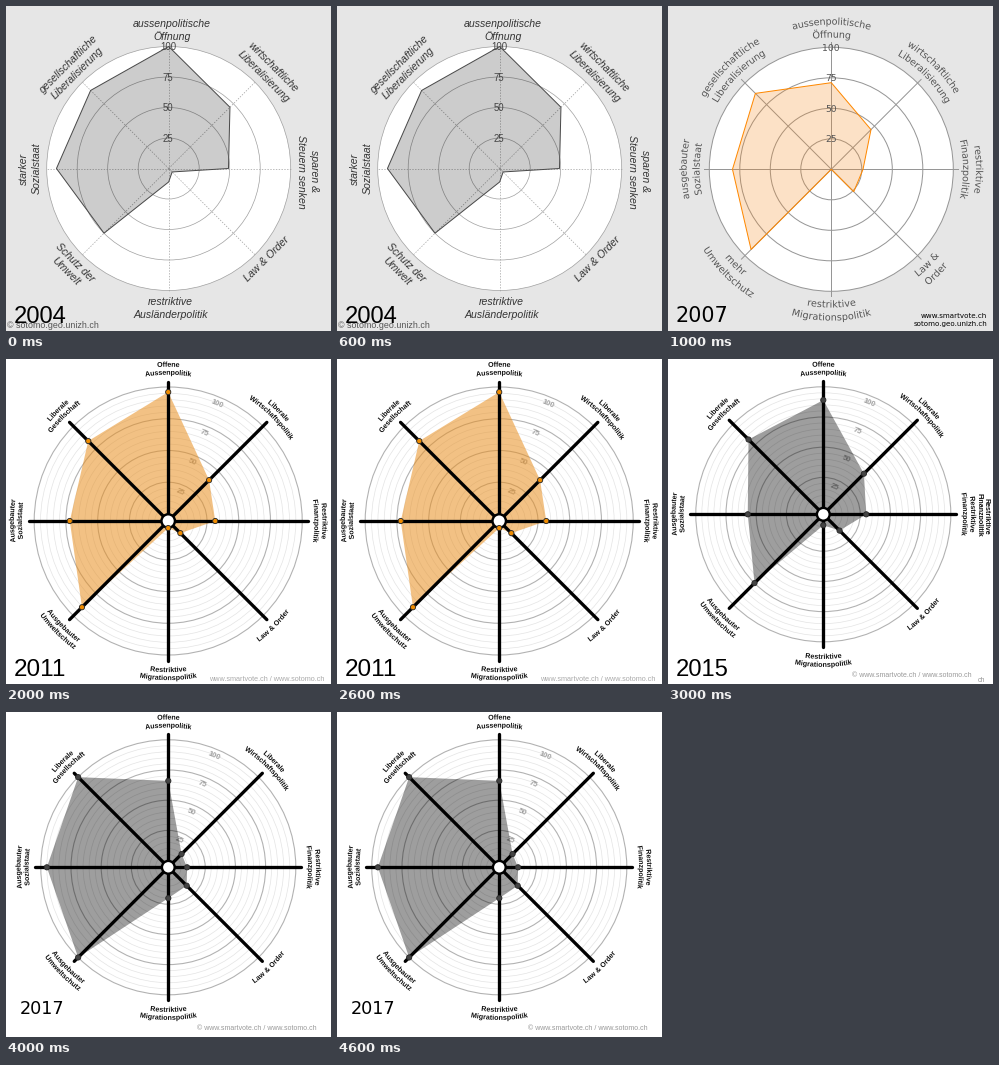
Recreate the animation shown at these times as a matplotlib script. Size 325 by 325 pixels, loop 5 s.

```python
import numpy as np
import matplotlib.pyplot as plt
from matplotlib.animation import FuncAnimation
from matplotlib.patches import Circle, PathPatch, Polygon, Rectangle
from matplotlib.path import Path
from matplotlib.textpath import TextPath

SIZE, DPI = 325, 100
PX = 72 / DPI
ROT = (0, -45, -90, 45, 0, -45, 90, 45)
OUTER_FIRST = (0, 1, 2, 6, 7)
SANS, WIDE = "Liberation Sans", "DejaVu Sans"

MODERN = ("Offene\nAussenpolitik", "Liberale\nWirtschaftspolitik",
          "Restriktive\nFinanzpolitik", "Law & Order",
          "Restriktive\nMigrationspolitik", "Ausgebauter\nUmweltschutz",
          "Ausgebauter\nSozialstaat", "Liberale\nGesellschaft")

fig = plt.figure(figsize=(SIZE / DPI, SIZE / DPI), dpi=DPI)
ax = fig.add_axes([0, 0, 1, 1])


def polar(center, r, i):
    a = np.pi / 4 * i
    return center[0] + r * np.sin(a), center[1] - r * np.cos(a)


def put(x, y, text, px, rot=0, ha="center", color="#222222", font=SANS, **kw):
    """Text whose middle line passes through (x, y)."""
    a = np.radians(rot)
    drop = 0.34 * px
    ax.text(x + drop * np.sin(a), y + drop * np.cos(a), text, fontsize=px * PX,
            rotation=rot, rotation_mode="anchor", ha=ha, va="baseline",
            color=color, family=font, zorder=8, **kw)


def put_arc(center, r, i, up, text, px, color, font=SANS, weight="normal"):
    """Text bent along a circle; up is 1 if its top points outwards, else -1."""
    path = TextPath((0, 0), text, size=px, prop=dict(family=font, weight=weight))
    u, v = path.vertices.T
    u = u - (u.min() + u.max()) / 2
    x, y = polar(center, r + up * (v - 0.34 * px), i + up * u / r * 4 / np.pi)
    ax.add_patch(PathPatch(Path(np.column_stack((x, y)), path.codes),
                           fc=color, ec="none", zorder=8))


def line(a, b, color, width, z, **kw):
    ax.plot([a[0], b[0]], [a[1], b[1]], color=color, lw=width * PX, zorder=z, **kw)


def ring(center, r, color, width, z=2, fill="none"):
    ax.add_patch(Circle(center, r, fc=fill, ec=color, lw=width * PX, zorder=z))


def area(points, color, alpha):
    ax.add_patch(Polygon(points, fc=color, ec="none", alpha=alpha, zorder=4))


def label_rows(labels, inner, outer):
    """Yield (axis, up, radius, row) for every row of every label."""
    for i, label in enumerate(labels):
        up = 1 if i in OUTER_FIRST else -1
        for row, r in zip(label.split("\n"), (outer, inner)[::up]):
            yield i, up, r, row


def straight_labels(center, labels, inner, outer, px, nudge, **kw):
    for i, _, r, row in label_rows(labels, inner, outer):
        x, y = polar(center, r, i)
        a = np.radians(ROT[i])
        put(x + nudge[i] * np.cos(a), y - nudge[i] * np.sin(a), row, px, ROT[i], **kw)


def bent_labels(center, labels, inner, outer, px, **kw):
    for i, up, r, row in label_rows(labels, inner, outer):
        put_arc(center, r, i, up, row, px, **kw)


def background(color):
    ax.add_patch(Rectangle((-5, -5), SIZE + 10, SIZE + 10, fc=color, ec="none", zorder=0))


def classic(center, values, fill, alpha, edge, grid, width, reach, tick, **spoke):
    background("#e6e6e6")
    ring(center, 122, "none", 0, 1, "white")
    for i in range(8):
        line(center, polar(center, reach, i), grid, width, 3, **spoke)
    points = [polar(center, 1.22 * v, i) for i, v in enumerate(values)]
    area(points, fill, alpha)
    ax.add_patch(Polygon(points, fc="none", ec=edge, lw=PX, zorder=5))
    for v in (25, 50, 75, 100):
        ring(center, 1.22 * v, grid, width)
        put(center[0] - 0.5, center[1] - 1.22 * v + 0.5, str(v), **tick)


def modern(center, radius, values, fill, alpha, dot):
    background("white")
    hub = radius * 0.0525
    reach = radius + 5.5

    def scale(v):
        return hub + (radius - hub) * v / 100

    for v in range(5, 101, 5):
        if v % 25:
            ring(center, scale(v), "#e4e4e4", 0.7)
        else:
            ring(center, scale(v), "#b2b2b2", 1.1)
            x, y = polar(center, scale(v) - 7.3, 0.5)
            ax.text(x, y, str(v), fontsize=7.8 * PX, rotation=-22.5, ha="center",
                    va="center", color="#a0a0a0", family=SANS, weight="bold", zorder=3)
    points = [polar(center, scale(v), i) for i, v in enumerate(values)]
    area(points, fill, alpha)
    for i in range(4):
        line(polar(center, reach, i), polar(center, reach, i + 4), "black", 3.3, 5,
             solid_capstyle="round")
    ring(center, hub - 0.3, "black", 2.4, 6, "white")
    for p in points:
        ring(p, 2.6, "#2a2a2a", 0.9, 7, dot)
    bent_labels(center, MODERN, radius + 14.7, radius + 22.7, 7.1,
                color="#111111", weight="bold")


def year(text, px, x=7.5, y=308.5, font=SANS):
    put(x, y, text, px, ha="left", color="black", font=font)


def chart_2004():
    center = 162.7, 162.5
    classic(center, (100, 71, 49, 4, 11, 75, 92, 90.5), "black", 0.2, "#4a4a4a",
            "#a0a0a0", 0.7, 122, dict(px=9.6, color="#444444"), linestyle=(0, (2, 2)))
    straight_labels(center,
                    ("aussenpolitische\nÖffnung", "wirtschaftliche\nLiberalisierung",
                     "sparen &\nSteuern senken", "Law & Order",
                     "restriktive\nAusländerpolitik", "Schutz der\nUmwelt",
                     "starker\nSozialstaat", "gesellschaftliche\nLiberalisierung"),
                    132.5, 145.5, 10.5, (3, 2, 3, 5, 2, 0, 0, 3),
                    color="#333333", style="italic")
    year("2004", 23.8)
    put(1, 319, "© sotomo.geo.unizh.ch", 8.9, ha="left", color="#555555")


def chart_2007():
    center = 163.3, 163.3
    classic(center, (71, 46, 26, 26, 0, 93, 81, 88), "#f58a1f", 0.25, "#ff8800",
            "#969696", 1, 127, dict(px=9.3, color="#555555", font=WIDE))
    bent_labels(center,
                ("aussenpolitische\nÖffnung", "wirtschaftliche\nLiberalisierung",
                 "restriktive\nFinanzpolitik", "Law &\nOrder",
                 "restriktive\nMigrationspolitik", "mehr\nUmweltschutz",
                 "ausgebauter\nSozialstaat", "gesellschaftliche\nLiberalisierung"),
                135, 148, 9.6, color="#555555", font=WIDE)
    year("2007", 20.8, font=WIDE)
    put(319, 309.5, "www.smartvote.ch", 7.1, ha="right", color="black", font=WIDE)
    put(319, 318, "sotomo.geo.unizh.ch", 7.1, ha="right", color="black", font=WIDE)


def chart_2011():
    modern((162.2, 162), 134, (96, 40, 31.5, 8, 0, 90.5, 72, 83.5),
           "#e88f20", 0.55, "#f08c00")
    year("2011", 24.3)
    put(318, 320, "www.smartvote.ch / www.sotomo.ch", 7.3, ha="right", color="#aaaaaa")


def chart_2015():
    modern((155.3, 155.3), 127.5, (89, 42, 30, 13.5, 3.5, 75, 57, 82),
           "black", 0.38, "#444444")
    year("2015", 23.8)
    # leftover second copy of the right-hand label, partly cut off
    bold = dict(color="#111111", weight="bold")
    put(319, 157, "Restriktive", 7.1, -90, **bold)
    put(312, 156, "Finanzpolitik", 7.1, -90, **bold)
    ax.add_patch(Rectangle((308.6, 130), 2.2, 50, fc="white", ec="none", zorder=9))
    put(304, 316, "© www.smartvote.ch / www.sotomo.ch", 7, ha="right", color="#999999")
    put(314, 321, "ch", 7, color="#999999")


def chart_2017():
    modern((162.3, 155.3), 127.5, (66, 10, 10, 16, 20, 100, 95, 100),
           "black", 0.38, "#444444")
    year("2017", 17.6, 14, 296.5, WIDE)
    put(311, 316, "© www.smartvote.ch / www.sotomo.ch", 7, ha="right", color="#999999")


CHARTS = (chart_2004, chart_2007, chart_2011, chart_2015, chart_2017)


def draw(k):
    ax.clear()
    ax.set_xlim(0, SIZE)
    ax.set_ylim(SIZE, 0)
    ax.axis("off")
    CHARTS[k]()
    return []


anim = FuncAnimation(fig, draw, frames=len(CHARTS), interval=1000,
                     repeat=True, repeat_delay=0)
plt.show()
```
